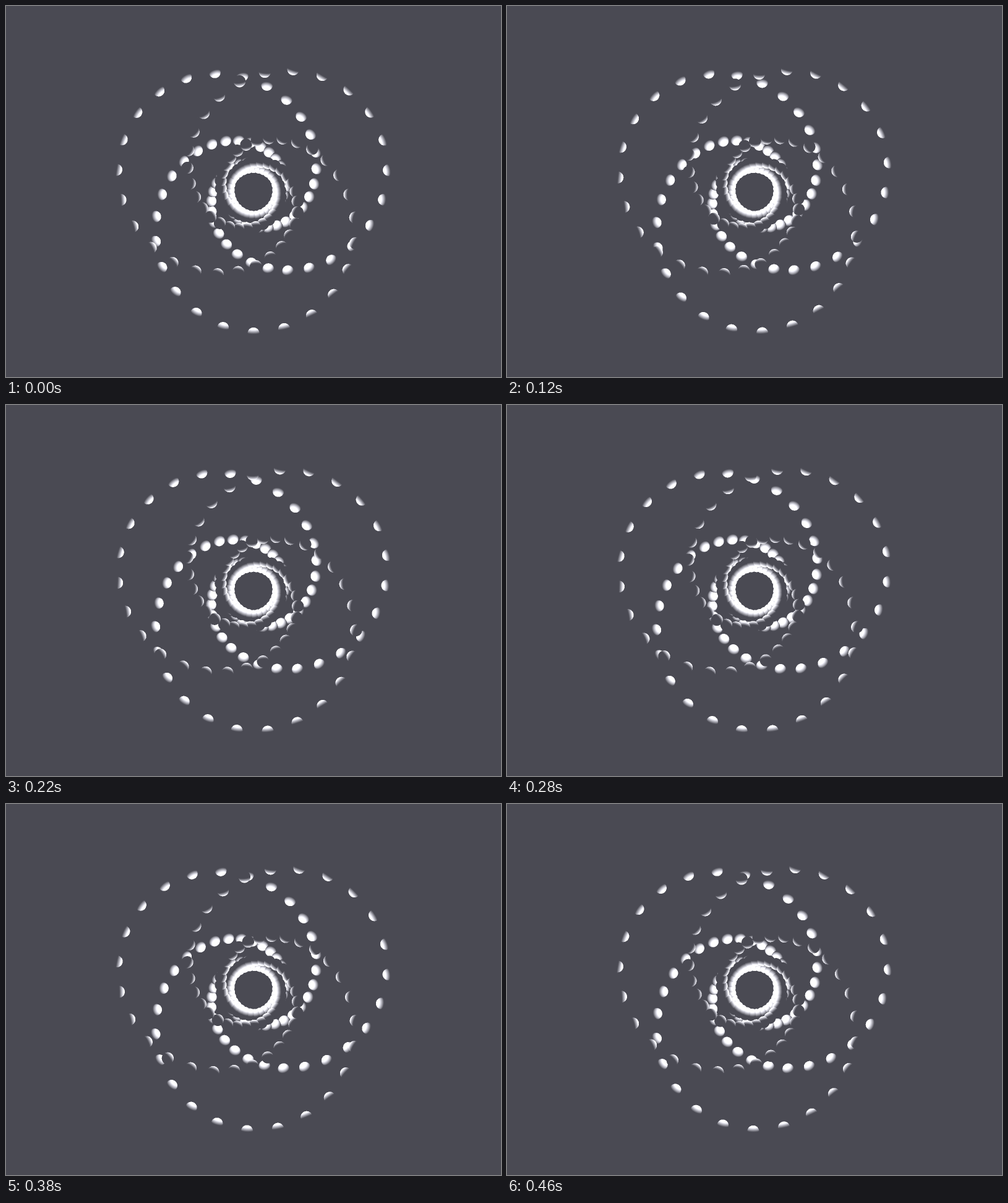
Animation of 800 by 600 pixels, one loop 0.48 s. Source, as an HTML page with a canvas:

```html
<!DOCTYPE html>
<html lang="en">
<head>
<meta charset="utf-8">
<title>Torus knot of beads</title>
<style>
  html, body { margin: 0; width: 100%; height: 100%; overflow: hidden; background: rgb(74, 74, 83); }
  canvas { display: block; }
</style>
</head>
<body>
<canvas id="stage" width="800" height="600"></canvas>
<script>
const LOOP = 480, STEP = 20;
const BEADS = 200, TURNS = 7, WINDS = 3;
const TUBE = 95;            // minor radius; the major radius is TUBE * sqrt(2)
const BEAD = 9.5;
const CAMERA = 5000;
const LIGHT_Z = 42;         // the light sits on the axis, a little towards the viewer
const BG = [74, 74, 83];
const HALF = 250, SCALE = 2, SIZE = HALF * 2 * SCALE;

const stage = document.getElementById('stage').getContext('2d');
const buffer = document.createElement('canvas');
buffer.width = buffer.height = SIZE;
const bufferCtx = buffer.getContext('2d');
const image = bufferCtx.createImageData(SIZE, SIZE);
const pixels = image.data;
const words = new Uint32Array(pixels.buffer);
const depth = new Float32Array(SIZE * SIZE);

pixels.set([...BG, 255]);
const bgWord = words[0];

// Point on a (7, 3) knot on the Clifford torus, z towards the viewer.
function knotPoint(index) {
  const angle = 2 * Math.PI * index / BEADS;
  const phi = TURNS * angle, psi = WINDS * angle;
  const r = TUBE / (Math.SQRT2 - Math.cos(psi));
  return { x: -r * Math.sin(phi), y: r * Math.cos(phi), z: -r * Math.sin(psi) };
}

// Depth-tested sphere lit by the point light.
function drawBead(p) {
  const zoom = CAMERA / (CAMERA - p.z);
  const radius = BEAD * zoom * SCALE;
  const cx = (p.x * zoom + HALF) * SCALE;
  const cy = (p.y * zoom + HALF) * SCALE;
  for (let py = Math.floor(cy - radius); py <= cy + radius; py++) {
    const ny = (py + 0.5 - cy) / radius;
    for (let px = Math.floor(cx - radius); px <= cx + radius; px++) {
      const nx = (px + 0.5 - cx) / radius;
      const rest = 1 - nx * nx - ny * ny;
      if (rest < 0 || px < 0 || py < 0 || px >= SIZE || py >= SIZE) continue;
      const nz = Math.sqrt(rest);
      const z = p.z + BEAD * nz;
      const at = py * SIZE + px;
      if (z <= depth[at]) continue;
      depth[at] = z;
      const lx = -p.x - BEAD * nx, ly = -p.y - BEAD * ny, lz = LIGHT_Z - z;
      const facing = (nx * lx + ny * ly + nz * lz) / Math.sqrt(lx * lx + ly * ly + lz * lz);
      const light = 255 * Math.max(0, facing);
      for (let c = 0; c < 3; c++) pixels[at * 4 + c] = BG[c] + light;
    }
  }
}

function draw(now) {
  const step = Math.floor((now % LOOP + 0.01) / STEP);
  const shift = step * STEP / LOOP;
  words.fill(bgWord);
  depth.fill(-Infinity);
  for (let i = 0; i < BEADS; i++) drawBead(knotPoint(i - shift));
  bufferCtx.putImageData(image, 0, 0);
  stage.fillStyle = `rgb(${BG})`;
  stage.fillRect(0, 0, 800, 600);
  stage.drawImage(buffer, 400 - HALF, 300 - HALF, HALF * 2, HALF * 2);
}

function tick(now) {
  draw(now);
  requestAnimationFrame(tick);
}
draw(0);
requestAnimationFrame(tick);
</script>
</body>
</html>
```
